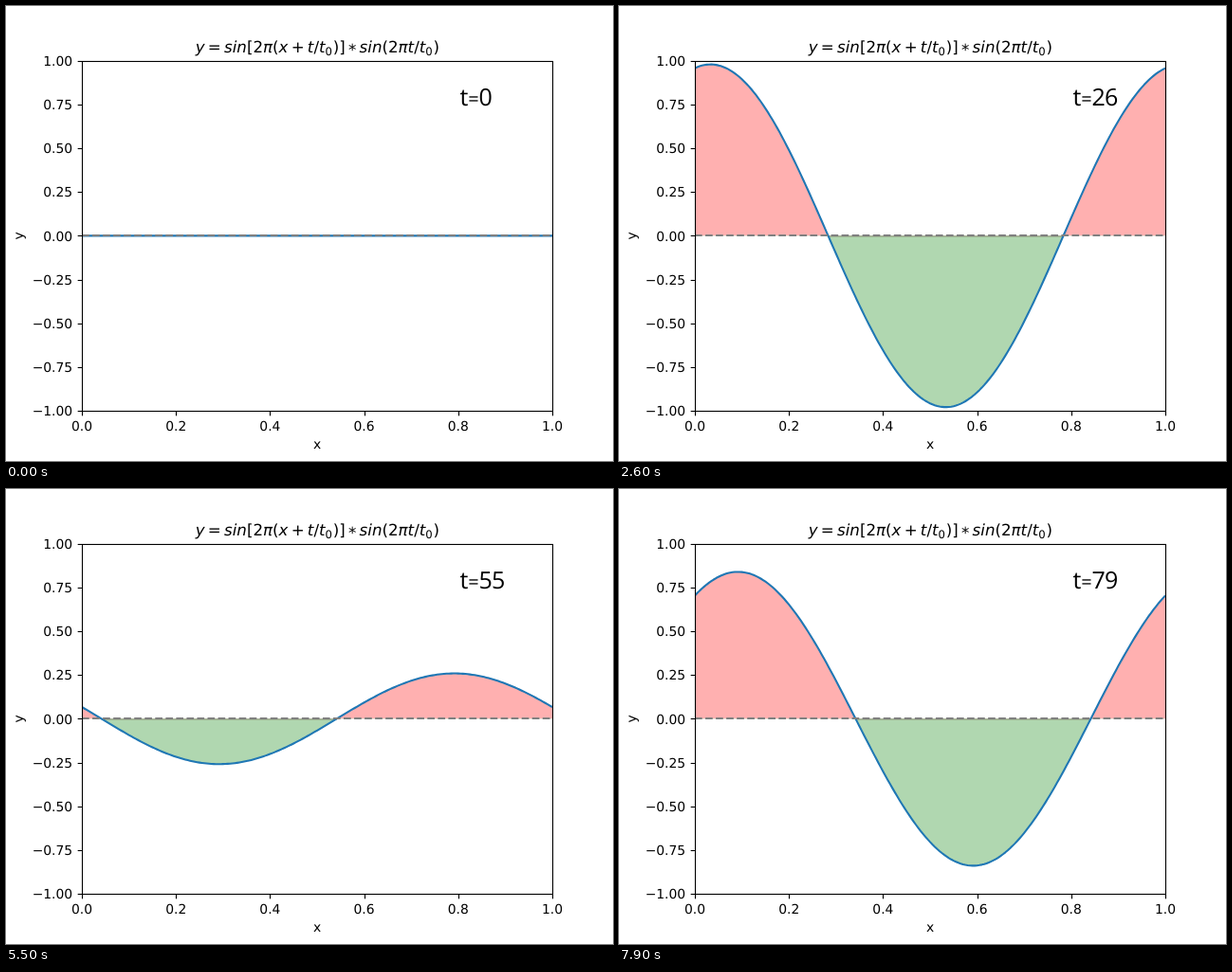
These frames come from a looping animation (640x480 px, 8000 ms). An HTML page:

```html
<!DOCTYPE html>
<html lang="en">
<head>
<meta charset="utf-8">
<title>Modulated sine wave</title>
<style>
  html, body { margin: 0; width: 100%; height: 100%; overflow: hidden; background: #fff; }
  svg { display: block; width: 640px; height: 480px; }
  text { font: 13.89px "DejaVu Sans", sans-serif; text-rendering: geometricPrecision; }
  #formula { font-size: 16.67px; font-style: italic; font-kerning: none; }
  #formula .up { font-style: normal; }
  #formula .sub { font-style: normal; font-size: 11.67px; }
  #counter text { font: 25px "Open Sans", sans-serif; text-anchor: middle; }
  #counter .equals { font-size: 20px; }
</style>
</head>
<body>
<svg viewBox="0 0 640 480">
  <clipPath id="box"><rect x="80" y="57.6" width="496" height="369.6"/></clipPath>
  <clipPath id="upper"><rect x="80" y="57.6" width="496" height="184.8"/></clipPath>
  <clipPath id="lower"><rect x="80" y="242.4" width="496" height="184.8"/></clipPath>

  <path class="area" clip-path="url(#upper)" fill="#ffb0b0"/>
  <path class="area" clip-path="url(#lower)" fill="#b0d7b0"/>
  <path id="edge" stroke="#98a888" stroke-width="1.5"/>
  <g clip-path="url(#box)" fill="none" stroke-width="2.08">
    <path id="curve" stroke="#1f77b4" stroke-linejoin="round"/>
    <path d="M80 242H576" stroke="#808080" stroke-dasharray="7.71 3.33"/>
  </g>
  <g id="axes" fill="none" stroke="#000" stroke-width="1.11">
    <rect x="80.5" y="58.5" width="496" height="369"/>
  </g>
  <g id="labels"></g>
  <text x="328" y="467" text-anchor="middle">x</text>
  <text transform="translate(18.4 242.4) rotate(-90)" text-anchor="middle">y</text>
  <text id="formula" x="199.7" y="49.3">y<tspan class="up" dx="3.25">=</tspan><tspan dx="3.25">sin</tspan><tspan class="up">[2</tspan>π<tspan class="up">(</tspan>x<tspan class="up" dx="3.25">+</tspan><tspan dx="3.25">t</tspan><tspan class="up">/</tspan>t<tspan class="sub" dy="2.5">0</tspan><tspan class="up" dx=".8" dy="-2.5">)]</tspan><tspan class="up" dx="3.25" dy="3">*</tspan><tspan dx="3.25" dy="-3">sin</tspan><tspan class="up">(2</tspan>πt<tspan class="up">/</tspan>t<tspan class="sub" dy="2.5">0</tspan><tspan class="up" dx=".8" dy="-2.5">)</tspan></text>
  <g id="counter">
    <text x="483" y="104.5">t</text>
    <text class="equals" x="493" y="104.5">=</text>
    <text class="digit" y="104.5"></text>
    <text class="digit" y="104.5"></text>
  </g>
</svg>
<script>
const LEFT = 80, WIDTH = 496, ZERO = 242.4, SCALE = 184.8;
const PERIOD = 120, STEPS = 80, STEP_MS = 100;
const $ = id => document.getElementById(id);
const areas = document.querySelectorAll('.area');
const digits = document.querySelectorAll('.digit');

function add(parent, tag, attrs, content = '') {
  const el = document.createElementNS('http://www.w3.org/2000/svg', tag);
  for (const key in attrs) el.setAttribute(key, attrs[key]);
  el.textContent = content;
  parent.append(el);
}

const snap = v => Math.floor(v + 0.5) + 0.5;

for (let i = 0; i <= 5; i++) {
  const x = LEFT + WIDTH * i / 5;
  add($('axes'), 'path', { d: `M${snap(x)} 427.5v4.86` });
  add($('labels'), 'text', { x, y: 447.7, 'text-anchor': 'middle' }, (i / 5).toFixed(1));
}
for (let i = -4; i <= 4; i++) {
  const y = ZERO - SCALE * i / 4;
  add($('axes'), 'path', { d: `M80.5 ${snap(y)}h-4.86` });
  add($('labels'), 'text', { x: 70.2, y: y + 5.2, 'text-anchor': 'end' },
    (i / 4).toFixed(2).replace('-', '\u2212'));
}

function drawCounter(t) {
  const chars = String(t);
  let x = 499;
  digits.forEach((el, i) => {
    const c = chars[i] || '';
    const advance = c === '1' ? 9.5 : 13.5;
    el.textContent = c;
    el.setAttribute('x', x + advance / 2);
    x += advance;
  });
}

function draw(t) {
  const phase = t / PERIOD;
  const amp = t % 60 ? Math.sin(2 * Math.PI * phase) : 0;
  const points = [];
  for (let i = 0; i <= 200; i++) {
    const x = i / 200;
    const y = amp * Math.sin(2 * Math.PI * (x + phase));
    points.push(`${(LEFT + WIDTH * x).toFixed(2)} ${(ZERO - SCALE * y).toFixed(2)}`);
  }
  const line = 'M' + points.join('L');
  $('curve').setAttribute('d', line);
  areas.forEach(a => a.setAttribute('d', `${line}V${ZERO}H${LEFT}Z`));

  // The negative lobe always spans half the axis.
  const start = LEFT + WIDTH * (0.5 - phase % 0.5);
  $('edge').setAttribute('d', amp ? `M${start} 242.9h${WIDTH / 2}` : '');
  drawCounter(t);
}

let shown = -1;
function tick() {
  const t = Math.floor(performance.now() / STEP_MS) % STEPS;
  if (t !== shown) draw(shown = t);
  requestAnimationFrame(tick);
}
tick();
</script>
</body>
</html>
```
